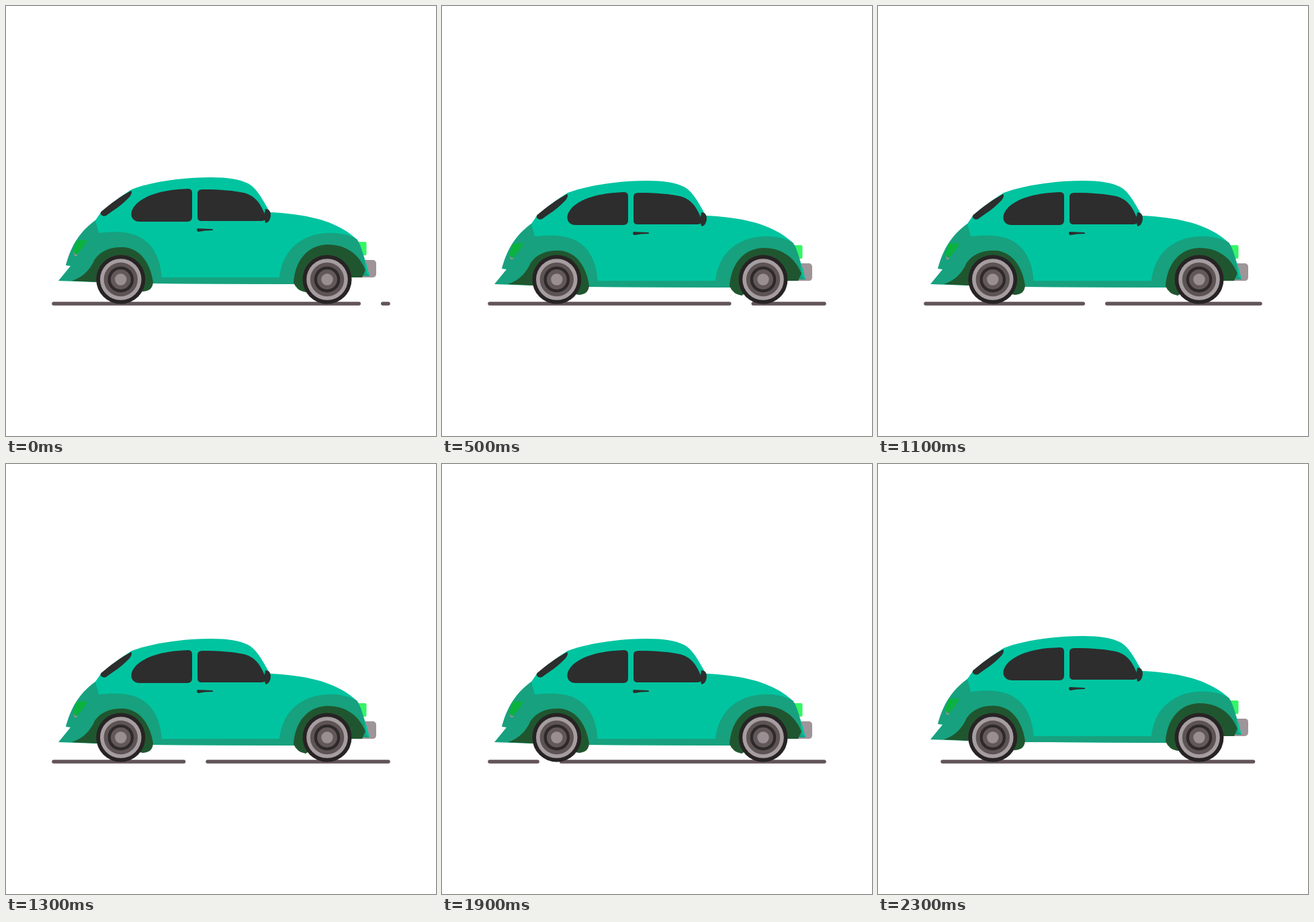
These frames come from a looping animation (640 by 640 pixels, 2.4 s). An HTML page:

```html
<!DOCTYPE html>
<html lang="en">
<head>
<meta charset="utf-8">
<title>Car</title>
<style>
  html, body { margin: 0; width: 100%; height: 100%; overflow: hidden; background: #fff; }
  svg { display: block; width: 100%; height: 100%; }
  .paint { fill: #00c4a0; }
  .fender { fill: #17a17f; }
  .arch { fill: #20562f; }
  .glass { fill: #2d2d2d; }
</style>
</head>
<body>
<svg viewBox="0 0 640 640">
  <defs>
    <g id="wheel">
      <circle r="36.5" fill="#272324"/>
      <circle r="30.8" fill="#a59da0"/>
      <circle r="25.2" fill="#5d5355"/>
      <circle r="19.3" fill="#2e292a"/>
      <circle r="15" fill="#625759"/>
      <circle r="8.7" fill="#998e91"/>
    </g>
  </defs>

  <path id="road" d="M71 443H569" fill="none" stroke="#62545a" stroke-width="5.5"
        stroke-linecap="round" stroke-dasharray="462.5 35.5"/>

  <g id="car">
    <rect x="522" y="378" width="29" height="26" rx="5" fill="#9e9599"/>
    <rect x="520" y="351" width="16.5" height="20" rx="2" fill="#35f566"/>

    <!-- body and sill -->
    <path class="paint" d="M116 342Q122 329 133 319L142 306C156 294 171 283 187 273C215 262 262 255 305 255C330 255 348 258 360 264C374 271 384 292 393 307C455 310 495 322 523 348L500 412L428 414L220 413L125 400Z"/>
    <path class="fender" d="M228 404H412V414L220 413Z"/>

    <!-- rear fender -->
    <path class="fender" d="M78 409L96 387L89 386C95 364 105 339 133 319L138 338C158 335 182 336 195 342C220 353 232 378 232 413H218L170 380L134 411Z"/>
    <path class="arch" d="M98 409C116 403 126 391 132 377C142 363 158 358 175 359C201 361 215 384 219 411C218 421 213 424 204 425L138 411Z"/>
    <path fill="#9e9599" d="M101 366L105 364L106 372H102Z"/>
    <path fill="#0cb23e" d="M105 349L121 348Q116 360 104 371L100 365Z"/>

    <!-- front fender -->
    <path class="fender" d="M406 414C408 380 420 358 447 345C470 335 502 335 522 347C528 354 532 370 541 402L530 402L478 380L430 414Z"/>
    <path class="arch" d="M428 412C430 380 448 356 478 355C508 355 526 371 535 393L530 404H480L446 426Q433 424 428 412Z"/>
    <path class="paint" d="M533 374Q538 388 541 402L536 397Z"/>

    <!-- windows, mirror and handle -->
    <g class="glass">
      <path d="M186 275Q189 277 184 284C172 297 160 304 149 312Q144 314 141 310Q140 307 143 305C156 294 171 283 186 275Z"/>
      <path d="M271 272Q277 272 277 278V314Q277 321 270 321H199C188 321 184 312 188 303C198 282 235 273 271 272Z"/>
      <path d="M292 273C320 273 340 275 354 278C373 283 380 297 386 312Q388 320 380 320H291Q285 320 285 314V279Q285 273 292 273Z"/>
      <path d="M386 302Q394 302 394 312Q393 322 386 323L384 313Z"/>
      <path d="M285 331L307 332Q310 334 306 334Q295 334 287 336Q284 336 284 333Z"/>
    </g>
  </g>

  <use href="#wheel" x="170.8" y="407"/>
  <use href="#wheel" x="478" y="407"/>
</svg>
<script>
  const LOOP = 2400, STEP = 100, BOB = 800;
  const road = document.getElementById('road');
  const car = document.getElementById('car');
  const start = performance.now();

  function draw() {
    const now = performance.now() - start;
    const t = Math.floor((now + 8) / STEP) * STEP % LOOP;

    // the gap runs left along the road; the body bobs above the wheels
    const gap = Math.min(528, 532.5 - 0.204 * t);
    road.setAttribute('stroke-dashoffset', 536.25 - gap);
    const bob = 3 - 3 * Math.cos(2 * Math.PI * t / BOB);
    car.setAttribute('transform', `translate(0 ${bob.toFixed(2)})`);
    requestAnimationFrame(draw);
  }
  draw();
</script>
</body>
</html>
```
